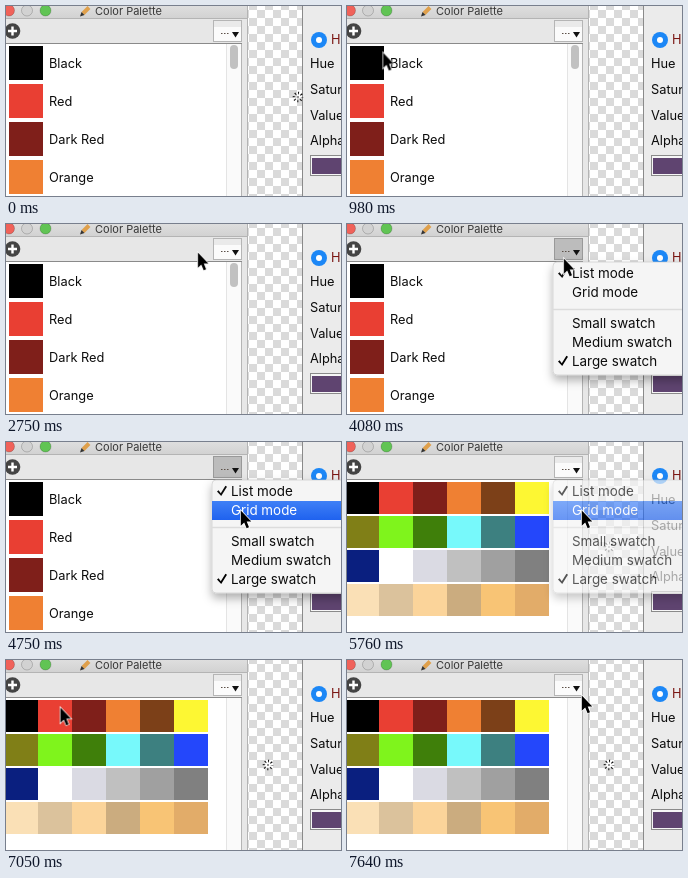
Animation, 335 px wide and 190 px high, one loop 8000 ms. Source, as an HTML page:

```html
<!DOCTYPE html>
<html lang="en">
<head>
<meta charset="utf-8">
<title>Color palette</title>
<style>
html, body { margin: 0; width: 100%; height: 100%; overflow: hidden; background: #fff; }
svg { display: block; width: 335px; height: 190px; }
text { font: 12.8px Inter, "Open Sans", sans-serif; fill: #0c0c0c; }
.title { font-size: 11px; fill: #383838; }
.menu text { font-size: 13.4px; }
.line { fill: none; stroke: #b4b4b4; }
.edge { fill: none; stroke: #8a8a8a; }

/* every animation shares one 8 s clock */
.list, .grid, .cross, .cross2, .pressed, .hl1, .hl2, .t1, .t2 { animation: 8s step-end infinite; }
.menu, .arrow { animation: 8s linear infinite; }
.list { animation-name: list; }
.grid { animation-name: grid; }
.cross { animation-name: cross; }
.cross2 { animation-name: cross2; }
.pressed { animation-name: pressed; }
.hl1 { animation-name: hl1; }
.hl2 { animation-name: hl2; }
.t1 { animation-name: t1; }
.t2 { animation-name: t2; }
.menu { animation-name: menu; }
.arrow { animation-name: arrow; }

@keyframes list { 0% { opacity: 1 } 71.75%, 100% { opacity: 0 } }
@keyframes grid { 0% { opacity: 0 } 71.75%, 100% { opacity: 1 } }
@keyframes cross { 0% { opacity: 1 } 6.625%, 100% { opacity: 0 } }
@keyframes cross2 { 0% { opacity: 0 } 44.25%, 100% { opacity: 1 } }
@keyframes pressed { 0% { opacity: 0 } 44.25% { opacity: 1 } 71.75%, 100% { opacity: 0 } }
@keyframes hl1 { 0% { opacity: 0 } 54.5% { opacity: 1 } 57.1%, 100% { opacity: 0 } }
@keyframes hl2 { 0% { opacity: 0 } 57.1% { opacity: 1 } 70.625% { opacity: 0 } 71.25%, 100% { opacity: 1 } }
@keyframes t1 { 0% { fill: #0c0c0c } 54.5% { fill: #fff } 57.1%, 100% { fill: #0c0c0c } }
@keyframes t2 { 0% { fill: #0c0c0c } 57.1% { fill: #fff } 70.625% { fill: #0c0c0c } 71.25%, 100% { fill: #fff } }
@keyframes menu {
  0%, 44.24% { opacity: 0 }
  44.25%, 71.5% { opacity: 1 }
  72% { opacity: .68 }
  73%, 100% { opacity: 0 }
}
@keyframes arrow {
  0%, 6.62% { transform: translate(-40px, -40px) }
  6.625% { transform: translate(250px, 113px) }
  7.3% { transform: translate(150px, 70px) }
  8.125%, 11.5% { transform: translate(41px, 37px) }
  13.25%, 16.625% { transform: translate(28px, 56px) }
  19%, 21.625% { transform: translate(-14px, 56px) }
  22.875% { transform: translate(30px, 44px) }
  25% { transform: translate(66px, 16px) }
  28%, 30.5% { transform: translate(92px, -20px) }
  32.5% { transform: translate(150px, 12px) }
  34.375% { transform: translate(191px, 27px) }
  37% { transform: translate(210px, 32px) }
  39.875%, 51% { transform: translate(216px, 33px) }
  53% { transform: translate(219px, 36px) }
  55.6% { transform: translate(228px, 48px) }
  57.5% { transform: translate(232px, 62px) }
  59.375%, 79.75% { transform: translate(234px, 67px) }
  81.5% { transform: translate(185px, 80px) }
  83.75% { transform: translate(90px, 86px) }
  86% { transform: translate(21px, 70px) }
  88.125% { transform: translate(53px, 46px) }
  89.75%, 90.125% { transform: translate(134px, 62px) }
  91.875% { transform: translate(172px, 76px) }
  94% { transform: translate(218px, 50px) }
  95.5%, 100% { transform: translate(234px, 34px) }
}
</style>
</head>
<body>
<svg viewBox="0 0 335 190">
  <defs>
    <pattern id="check" x="243" y="-4" width="16" height="16" patternUnits="userSpaceOnUse">
      <rect width="16" height="16" fill="#fff"/>
      <path d="M0 0h8v16h8V8H0z" fill="#dadada"/>
    </pattern>
    <linearGradient id="bar" x2="0" y2="1">
      <stop stop-color="#dedede"/><stop offset="1" stop-color="#d2d2d2"/>
    </linearGradient>
    <linearGradient id="blue" x2="0" y2="1">
      <stop stop-color="#3f80f6"/><stop offset="1" stop-color="#1f62ef"/>
    </linearGradient>
    <filter id="shadow" x="-20%" y="-20%" width="140%" height="150%">
      <feDropShadow dx="0" dy="5" stdDeviation="5" flood-opacity=".3"/>
    </filter>
    <g id="target">
      <circle r="4" fill="none" stroke="#111" stroke-width="2.600" stroke-dasharray="1 2.142" stroke-dashoffset=".5"/>
      <circle r=".8" fill="#111"/>
    </g>
    <path id="tick" d="M0 5l1.600-1.200 2.200 2.900L8.400-.8 10 .2 4.200 9.400z"/>
  </defs>

  <rect width="335" height="190" fill="url(#check)"/>

  <!-- colour editor -->
  <rect x="296" width="39" height="190" fill="#ebebeb"/>
  <path class="edge" d="M296.500 0V190"/>
  <circle cx="313" cy="34" r="8" fill="#1c87f6"/>
  <circle cx="313" cy="34" r="3" fill="#fff"/>
  <text x="325" y="38" style="fill:#7b1714">HSV</text>
  <text x="304" y="62">Hue</text>
  <text x="304" y="88">Saturation</text>
  <text x="304" y="113.500">Value</text>
  <text x="304" y="139">Alpha</text>
  <rect x="304.500" y="149.500" width="40" height="20" fill="#f6f6f6" stroke="#8a8a8a"/>
  <rect x="306" y="152" width="40" height="16" fill="#5f4470"/>

  <use href="#target" class="cross" x="292" y="91"/>
  <use href="#target" class="cross2" x="262" y="105"/>

  <!-- palette window -->
  <rect width="242" height="190" fill="#e7e7e7"/>
  <rect width="242" height="12" fill="url(#bar)"/>
  <path class="line" d="M0 12.500H241M241.500 0V190"/>
  <g stroke-opacity=".18" stroke="#000">
    <circle cx="3" cy="4.500" r="5.500" fill="#f0625a"/>
    <circle cx="21" cy="4.500" r="5.500" fill="#d2d2d2"/>
    <circle cx="39.500" cy="4.500" r="5.500" fill="#61c454"/>
  </g>
  <path d="M77 7.500L83 1.500" stroke="#dfa04c" stroke-width="4"/>
  <path d="M74 10.500l1.500-4.500 3 3z" fill="#333"/>
  <text class="title" x="89" y="9">Color Palette</text>
  <circle cx="6.500" cy="25" r="7.800" fill="#444"/>
  <path d="M2 25h9M6.500 20.500v9" stroke="#fff" stroke-width="2.400"/>

  <rect x="207.500" y="14.500" width="28" height="21" fill="#fbfbfb" stroke="#b5b5b5"/>
  <rect x="208" y="15" width="27" height="6" fill="#eaeaea"/>
  <rect class="pressed" x="207.500" y="14.500" width="28" height="21" fill="#bcbcbc" stroke="#999"/>
  <path d="M215 27.500h1.500m1.500 0h1.500m1.500 0h1.500" stroke="#5c5048" stroke-width="1.200"/>
  <path d="M226 26h7l-3.500 5.500z" fill="#111"/>

  <rect y="38" width="235" height="152" fill="#fff"/>
  <path class="edge" d="M0 37.500H236"/>
  <path class="line" d="M235.500 38V190"/>
  <rect x="221" y="38" width="14" height="152" fill="#fafafa"/>
  <path d="M220.500 38V190" stroke="#e4e4e4"/>
  <g class="list" id="list"><rect x="224" y="39" width="8" height="24" rx="4" fill="#c1c1c1"/></g>
  <g class="grid" id="grid"></g>

  <!-- pop-up menu -->
  <g class="menu">
    <rect x="206" y="38" width="145" height="113" rx="4" fill="#f5f5f5" stroke="#c4c4c4" stroke-width=".6" filter="url(#shadow)"/>
    <rect class="hl1" x="206" y="40" width="130" height="19" fill="url(#blue)"/>
    <rect class="hl2" x="206" y="59" width="130" height="19" fill="url(#blue)"/>
    <path d="M206 85.500H335" stroke="#dcdcdc" stroke-width="1.500"/>
    <use href="#tick" class="t1" x="211" y="44.500"/>
    <use href="#tick" x="211" y="132.500"/>
    <text class="t1" x="225" y="54">List mode</text>
    <text class="t2" x="225" y="73">Grid mode</text>
    <text x="225" y="104">Small swatch</text>
    <text x="225" y="123">Medium swatch</text>
    <text x="225" y="142">Large swatch</text>
  </g>

  <path class="arrow" d="M.8 1.500V16.800L4.200 13.600 6.600 19.200 9 18.200 6.700 12.600H11.300Z" fill="#000" stroke="#fff" stroke-width="1.400" paint-order="stroke"/>
</svg>
<script>
const colors = `000000 e93f33 7f1f1a ef8033 7c4018 fdf733
  807f17 7ff41c 3f7f0a 77f9fb 3d8080 2447fb
  0a1f7f ffffff dadae3 c0c0c0 a0a0a0 808080
  fae0b6 dbc29c fbd49a cbac7f f8c475 e2ac69`.split(/\s+/).map(c => '#' + c);

function add(parent, tag, attrs, text = '') {
  const el = document.createElementNS('http://www.w3.org/2000/svg', tag);
  for (const key in attrs) el.setAttribute(key, attrs[key]);
  el.textContent = text;
  parent.append(el);
}

const list = document.getElementById('list');
const grid = document.getElementById('grid');

['Black', 'Red', 'Dark Red', 'Orange'].forEach((name, i) => {
  const y = 40 + i * 38;
  add(list, 'rect', { x: 3, y, width: 34, height: 34, fill: colors[i] });
  add(list, 'text', { x: 43, y: y + 22 }, name);
});

colors.forEach((fill, i) => {
  const x = -2 + i % 6 * 34, y = 40 + Math.floor(i / 6) * 34;
  add(grid, 'rect', { x, y, width: 34, height: 32, fill });
});
</script>
</body>
</html>
```
